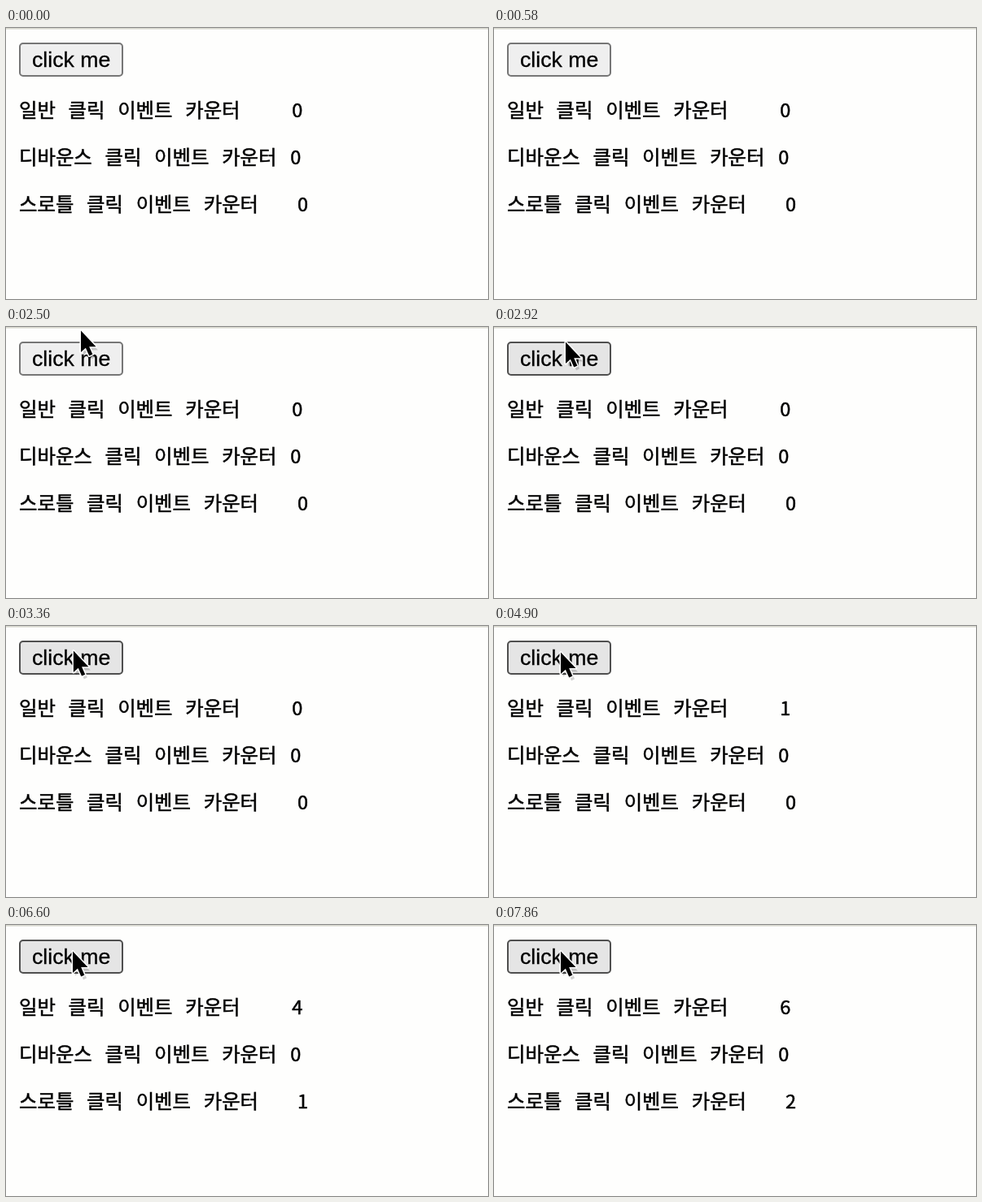
Write an HTML page that moves like this. It is 592 px wide and 334 px high and loops after 8000 ms.

```html
<!DOCTYPE html>
<html lang="ko">
<head>
<meta charset="utf-8">
<title>Click counters</title>
<style>
  html, body { margin: 0; width: 100%; height: 100%; overflow: hidden; background: #fefefd; }
  svg { display: block; width: 592px; height: 334px; }
  text { fill: #000; stroke: #000; stroke-width: .5; }
  .label, .count { font: 24.4px "Noto Sans CJK KR", "Noto Sans CJK", sans-serif; }
  .count { font-size: 23.5px; text-anchor: middle; }
  .caption { font: 26.67px "Liberation Sans", Arial, sans-serif; stroke-width: .3; }
</style>
</head>
<body>
<svg viewBox="0 0 592 334">
  <rect width="592" height="334" fill="#fefefd"/>
  <rect width="592" height="1.6" fill="#d9d9d0"/>
  <rect id="button" x="17" y="19" width="126" height="40" rx="4" stroke-width="2"/>
  <text class="caption" x="32" y="48">click me</text>
  <g id="rows"></g>
  <g id="cursor">
    <path d="M3 4V30L9 25L13 35L17 33L13.500 24H21Z" fill="#000" opacity=".18"/>
    <path d="M0 0V26.500L5.900 21.200L10.200 31L14.400 29.200L10.200 19.600H18.500Z"
          fill="#000" stroke="#fff" stroke-width="3" paint-order="stroke" stroke-linejoin="round"/>
  </g>
</svg>
<script>
const LOOP = 8000;
const HOVER_AT = 2820;
const GLYPH = 22.47, SPACE = 15.65;

// Each row: label, digit centre, baseline, times of increments
const rows = [
  { label: '일반 클릭 이벤트 카운터', x: 357.8, y: 110, ticks: [4900, 5400, 5900, 6500, 7020, 7540] },
  { label: '디바운스 클릭 이벤트 카운터', x: 355.8, y: 168, ticks: [] },
  { label: '스로틀 클릭 이벤트 카운터', x: 364.6, y: 226, ticks: [6320, 7860] }
];

// Pointer path: time, x, y
const path = [
  [2100, 108, -42], [2300, 97, -12], [2500, 92, 4.5], [2820, 89, 14.5],
  [2920, 88, 18.5], [3200, 84, 28], [3480, 82, 32.5]
];

const $ = id => document.getElementById(id);
const button = $('button'), cursor = $('cursor');

function addText(cls, x, y, content) {
  const el = document.createElementNS('http://www.w3.org/2000/svg', 'text');
  el.setAttribute('class', cls);
  el.setAttribute('x', x);
  el.setAttribute('y', y);
  el.textContent = content;
  $('rows').append(el);
  return el;
}

for (const row of rows) {
  let x = 16;
  for (const word of row.label.split(' ')) {
    addText('label', x, row.y - 0.5, word);
    x += word.length * GLYPH + SPACE;
  }
  row.digit = addText('count', row.x, row.y, '0');
}

function pointerAt(t) {
  const next = path.findIndex(p => p[0] > t);
  if (next === 0) return path[0].slice(1);
  if (next < 0) return path[path.length - 1].slice(1);
  const [t0, x0, y0] = path[next - 1], [t1, x1, y1] = path[next];
  const k = (t - t0) / (t1 - t0);
  return [x0 + (x1 - x0) * k, y0 + (y1 - y0) * k];
}

function render(t) {
  const hover = t >= HOVER_AT;
  button.setAttribute('fill', hover ? '#e5e5e5' : '#efefef');
  button.setAttribute('stroke', hover ? '#4f4f4f' : '#767676');
  const [x, y] = pointerAt(t);
  cursor.setAttribute('transform', `translate(${x} ${y})`);
  cursor.setAttribute('visibility', t > path[0][0] ? 'visible' : 'hidden');
  for (const { digit, ticks } of rows) {
    digit.textContent = ticks.filter(tick => tick <= t).length;
  }
}

const start = performance.now();
function loop() {
  render((performance.now() - start) % LOOP);
  requestAnimationFrame(loop);
}
render(0);
requestAnimationFrame(loop);
</script>
</body>
</html>
```
